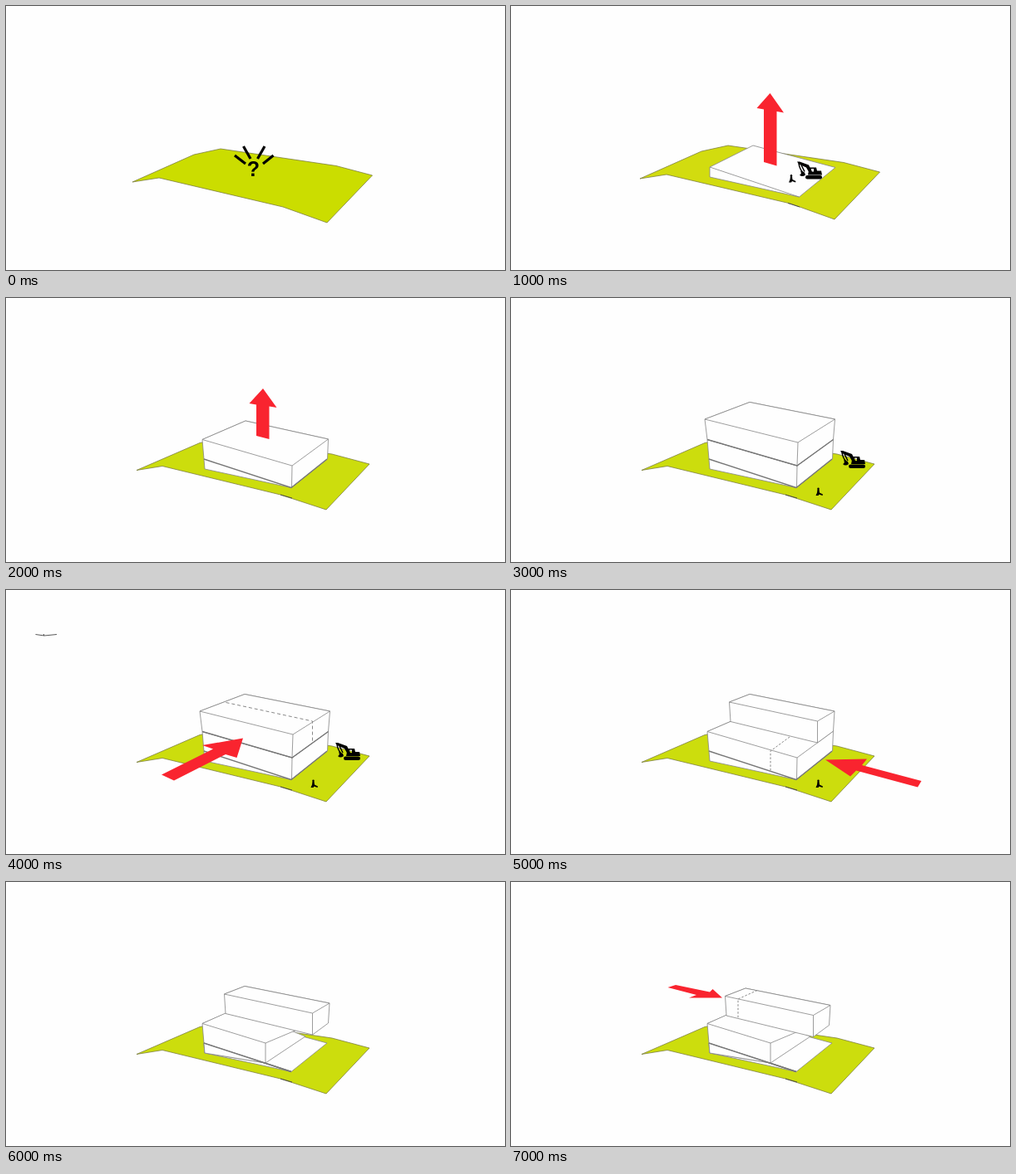
An HTML page that plays this animation: 600 by 318 pixels, repeating every 8000 ms.

```html
<!DOCTYPE html>
<html lang="en">
<head>
<meta charset="utf-8">
<title>Massing steps</title>
<style>
html, body { margin: 0; width: 100%; height: 100%; overflow: hidden; background: #fefefe; }
svg { display: block; width: 100%; height: 100%; }
.step { visibility: hidden; }
.land { fill: #ccdd0d; stroke: #77783f; stroke-width: .75; }
.face { fill: #fefefe; stroke: #858585; stroke-width: .8; stroke-linejoin: round; }
.edge { fill: none; stroke: #777; stroke-width: 1.4; }
.dark { fill: none; stroke: #444; stroke-width: .9; }
.dash { fill: none; stroke: #888; stroke-width: 1; stroke-dasharray: 4 3; }
.dash.fine { stroke-dasharray: 2.5 2; }
.arrow { fill: #f9242f; }
.ray { fill: none; stroke: #000; stroke-width: 3.2; }
text { font: bold 25px "Liberation Sans", Arial, sans-serif; text-anchor: middle; }
</style>
</head>
<body>
<svg id="stage" viewBox="0 0 600 318"></svg>
<script>
const STEP = 1000;
const poly = (cls, pts) => `<polygon class="${cls}" points="${pts}"/>`;
const line = (cls, pts) => `<polyline class="${cls}" points="${pts}"/>`;
const face = pts => poly('face', pts);
const arrow = pts => poly('arrow', pts);

const PLOT = '152,212 226,179 258,172 397,192.5 440.5,204 386,261 333,242 184,207';
const plot = (x, y, fill) =>
  `<g transform="translate(${x} ${y})"><polygon class="land" style="fill:${fill}" points="${PLOT}"/></g>`;

const land = poly('land', '157,207.5 233,174.5 262,169 392,188 437,200 385,255 330,237 188,202.5')
  + line('dark', '330,237 344,241');

const digger = (x, y) => `<g transform="translate(${x} ${y})">
  <path d="M0 0L3 0 14 4 18 12 15 14 11 7 2 3Z"/>
  <path d="M2 2Q3 9 7 13M5 4L9 12" fill="none" stroke="#000" stroke-width="1.5"/>
  <path d="M4 11L9 13 10 16Q6 19 3 16Q6 15 4 11Z"/>
  <path fill-rule="evenodd" d="M15 7L23 7 24 11 29 11 30 16 13 16 14 11ZM17 8.5L17 12 20 12 20 8.5Z"/>
  <rect x="10" y="16.5" width="20" height="4.5" rx="2.2"/></g>`;

const person = (x, y) => `<g transform="translate(${x} ${y})">
  <circle cx="3" cy="1.2" r="1.2"/>
  <path d="M2 2L4 2 4.5 6 8.5 8 8 9.5 4 8 3 9.5 0 9.5 1.5 6Z"/></g>`;

const slab = face('238,194 290,168 386,194 343,228.5 239,206') + line('edge', '238,194 343,228.5');

// Full lower storey standing on the slab
const base = face('236,170.5 239,206 343,228.5 386.5,194 387.5,170 288,148')
  + face('236,170.5 288,148 387.5,170 344,202')
  + line('face', '344,202 343.5,228')
  + line('edge', '238,194 343,228.5 386,194');

// Full upper storey
const top2 = face('233,146 236,170.5 344,202 387.5,170.5 389.5,146 287,125.5')
  + face('233,146 287,125.5 389.5,146 345,174')
  + line('face', '345,174 344,202')
  + line('edge', '236,170.5 344,202 387.5,170.5');

// Lower storey after its end is cut off
const cutBase = slab
  + face('236,170.5 239,206 312,218 360,186 335,176 288,148')
  + poly('face', '239,206 238,194 312,218')
  + face('236,170.5 264,158 350,178 312,194')
  + line('face', '312,194 312,218')
  + line('edge', '238,194 343,228.5');

const bar = (x, y) => `<g transform="translate(${x} ${y})">`
  + face('262.5,135 264,158.5 368.5,184 387.5,170 389,146 287,125.5')
  + face('262.5,135 287,125.5 389,146 368.5,158')
  + line('face', '368.5,158 368.5,184') + '</g>';

const lowerTwo = land + base + top2 + digger(396, 184) + person(366.5, 228.5);

const steps = [
  plot(0, 0, '#cbdd00')
    + ['275,180 288,190', '285.5,169 294,184', '311,169 302.5,184', '321.5,180 309,190']
      .map(p => line('ray', p)).join('')
    + '<text x="297.5" y="205">?</text>',

  plot(3, -4, '#d2dc0f')
    + line('dark', '333,237.5 347,242')
    + face('239,194 291,168 390,194.5 346.5,230 239,206')
    + line('face', '239,194 346.5,230')
    + arrow('311.5,105 328,128.5 319.5,127 319.5,192.5 304,188 304,124.5 295.5,123')
    + digger(344, 187.5) + person(334, 203),

  land + base
    + arrow('309,109 325.5,132 316.5,130.5 316.5,170 301,166 301,128.5 292.5,127'),

  lowerTwo,

  lowerTwo
    + line('dash', '264.5,135.5 368.5,158 368.5,184')
    + line('dark', '35.5,53.5 46,55 61,53.5') + line('dark', '45.5,53 45.5,55')
    + arrow('285,178.5 277.5,202 264,198 202,229.5 187,222.5 249,191.5 236,187'),

  land + base + bar(0, 0)
    + line('dash fine', '335,177 312,194 312,219')
    + person(366.5, 228.5)
    + arrow('378,204.5 428,203.5 422,211 493.5,230 489,237.5 415,217.5 408,224.5'),

  land + cutBase + bar(0, 0),

  land + cutBase + bar(-5, 2.5)
    + line('dash fine', '296,130.5 273,141 273,165')
    + arrow('254,139.5 214,139.5 223,136 188.5,127 198,124 239,132.5 242.5,129')
];

const stage = document.getElementById('stage');
stage.innerHTML = steps.map(s => `<g class="step">${s}</g>`).join('');
const groups = [...stage.children];
const start = performance.now();

function draw(now) {
  const on = Math.floor(Math.max(0, now - start) / STEP) % groups.length;
  groups.forEach((g, i) => { g.style.visibility = i === on ? 'visible' : 'hidden'; });
  requestAnimationFrame(draw);
}
draw(start);
</script>
</body>
</html>
```
